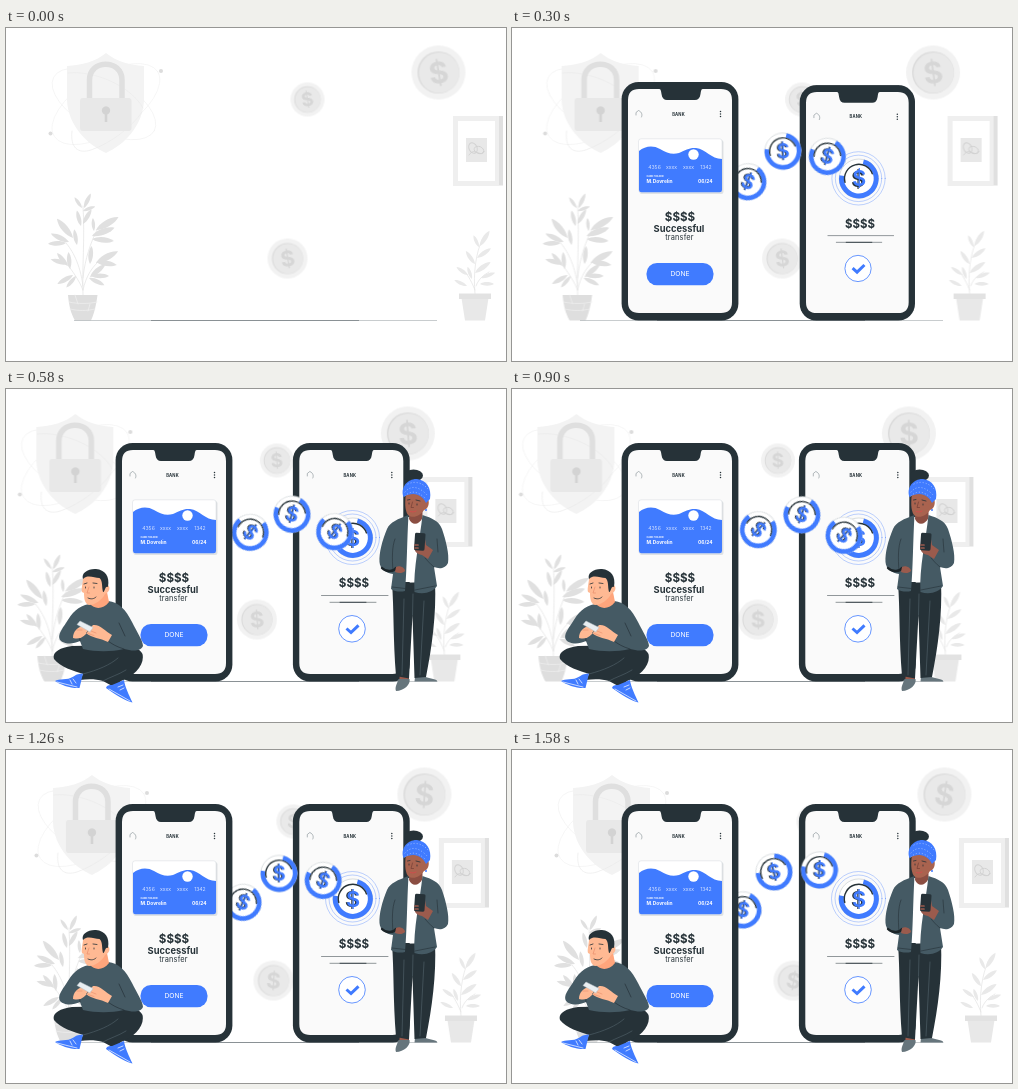
Write an HTML page that moves like this. It is 500 px wide and 333 px high and loops after 1.6 s.

```html
<!DOCTYPE html>
<html lang="en">
<head>
<meta charset="utf-8">
<title>Money transfer</title>
<style>
html, body { margin: 0; width: 100%; height: 100%; overflow: hidden; background: #fff; }
svg { display: block; width: 100vw; height: 100vh; font-family: Inter, "Open Sans", sans-serif; }
text { text-anchor: middle; }
.b { font-weight: 700; }
.start { text-anchor: start; }
.ln { fill: none; stroke-linecap: round; stroke-linejoin: round; }
.butt { stroke-linecap: butt; }
.dark { fill: #263238; }
.blue { fill: #407bff; }
.cloth { fill: #455a64; }

.sway, .spin, .coin, .pop, .grow1, .grow2, .inL, .inR {
  animation: 1.6s cubic-bezier(.37, 0, .63, 1) infinite;
}
.sway { animation-name: sway; }
.spin { animation-name: spin; }
.coin { animation-name: coin; }
.pop { animation-name: pop; }
.grow1 { animation-name: grow1; transform-origin: 168px 292px; }
.grow2 { animation-name: grow2; transform-origin: 348.7px 292px; }
.inL { animation-name: inL; animation-timing-function: ease-out; }
.inR { animation-name: inR; animation-timing-function: ease-out; }

@keyframes sway { 50% { transform: translateX(-37px); } }
@keyframes spin {
  0%, 100% { transform: rotate(-10deg); }
  50% { transform: rotate(10deg); }
}
@keyframes coin {
  0%, 100% { transform: translate(var(--x0), var(--y0)) rotate(var(--r0)); }
  50% { transform: translate(var(--x1), var(--y1)) rotate(var(--r1)); }
}
@keyframes pop { 0% { transform: scale(0); } 6%, 100% { transform: scale(1); } }
@keyframes grow1 { 0% { transform: scale(0); } 11%, 100% { transform: scale(1); } }
@keyframes grow2 { 0% { transform: scale(0); } 20.3%, 100% { transform: scale(1); } }
@keyframes inL { 0%, 19% { transform: translateX(-142px); } 36%, 100% { transform: none; } }
@keyframes inR { 0%, 19% { transform: translateX(130px); } 36%, 100% { transform: none; } }

.c1 { --x0: 231px; --y0: 160px; --r0: 10deg; --x1: 247px; --y1: 140px; --r1: 46deg; }
.c2 { --x0: 262px; --y0: 122px; --r0: -14deg; --x1: 291px; --y1: 126px; --r1: 20deg; }
.c3 { --x0: 307.5px; --y0: 120px; --r0: 2deg; --x1: 333px; --y1: 147.5px; --r1: 46deg; }
</style>
</head>
<body>
<svg viewBox="0 0 500 333">
  <defs>
    <g id="coin">
      <circle r="18.4" fill="#fff"/>
      <circle r="18.2" class="ln" stroke="#9aa5ab" stroke-width=".35"/>
      <circle r="16.1" class="ln butt" stroke="#407bff" stroke-width="4.6"
        pathLength="360" stroke-dasharray="265 95" transform="rotate(-75)"/>
      <circle r="13.3" class="ln" stroke="#263238" stroke-width="1.3"
        pathLength="360" stroke-dasharray="175 185" transform="rotate(-195)"/>
      <g font-size="20" font-weight="600">
        <text class="dark" x="-.8" y="7.4">$</text>
        <text class="blue" x=".3" y="7.1">$</text>
      </g>
    </g>
    <g id="token">
      <circle r="27" fill="#f2f2f2"/>
      <circle r="21" fill="#dadada"/>
      <circle r="20.3" cx=".7" cy=".3" fill="#e9e9e9"/>
      <g class="spin"><text class="b" y="10.8" font-size="30" fill="#d6d6d6">$</text></g>
    </g>
    <g id="shell">
      <rect class="dark" x="109.6" y="54" width="116.8" height="238.6" rx="17"/>
      <path fill="#fafafa" d="M127 61H147C149 61 149 63 149.500 66C150 70 152 72 155 72H183C186 72 188 70 188.500 66C189 63 189 61 191 61H209Q220 61 220 72V274Q220 285 209 285H127Q116 285 116 274V72Q116 61 127 61Z"/>
      <path class="ln" stroke="#7d888d" stroke-width=".6" d="M124 87V84.500L126.500 82.500C130 84 130.500 87 129.500 89"/>
      <text class="b dark" x="166.500" y="87.600" font-size="4.200" letter-spacing=".15">BANK</text>
      <g class="dark"><circle cx="208.500" cy="83.500" r=".75"/><circle cx="208.500" cy="86" r=".75"/><circle cx="208.500" cy="88.500" r=".75"/></g>
    </g>
    <path id="leaf" d="M0 0C.25 -.17 .7 -.19 1 0C.75 .16 .3 .17 0 0Z"/>
  </defs>

  <g class="sway">
    <g class="ln" stroke="#f1f1f1" stroke-width=".6">
      <ellipse cx="100" cy="76" rx="61" ry="29" transform="rotate(-32 100 76)"/>
      <ellipse cx="98" cy="76" rx="57" ry="27" transform="rotate(28 98 76)"/>
    </g>
    <path fill="#f3f3f3" d="M100 25C111 34 124 37 138 38V72C137 98 118 117 100 125C82 117 62 98 61 72V38C76 37 89 34 100 25Z"/>
    <path class="ln" stroke="#ebebeb" stroke-width=".7" d="M62 45C88 42 125 58 137 80M66 103C64 120 72 126 85 122C105 115 126 99 136 84"/>
    <path class="ln butt" stroke="#dfdfdf" stroke-width="5.500" d="M83.500 71V52C83.500 31 116 31 116 52V71"/>
    <rect x="74" y="70" width="51.500" height="33" rx="3" fill="#e8e8e8"/>
    <path fill="#d3d3d3" d="M98.700 94V86.500A4.200 4.200 0 1 1 101.300 86.500V94Z"/>
    <circle cx="155" cy="43" r="2" fill="#dcdcdc"/>
    <circle cx="44.500" cy="105.500" r="2" fill="#dcdcdc"/>

    <use href="#token" x="432.500" y="44.500"/>
    <use href="#token" transform="translate(301.500 71.500) scale(.63)"/>
    <use href="#token" transform="translate(281.500 230.500) scale(.74)"/>

    <path fill="#efefef" d="M447 88H497V158H447Z"/>
    <path fill="#e0e0e0" d="M493 88H497V157H493Z"/>
    <path fill="#fff" d="M452 93H489V153H452Z"/>
    <path fill="#e8e8e8" d="M460 110H481V134H460Z"/>
    <g class="ln" stroke="#d2d2d2" stroke-width=".9">
      <ellipse cx="467" cy="120" rx="4" ry="5.500" transform="rotate(-25 467 120)"/>
      <ellipse cx="473" cy="122" rx="5" ry="3.500" transform="rotate(20 473 122)"/>
      <path d="M463 127C469 118 474 130 478 124"/>
    </g>

    <g class="ln" stroke="#e3e3e3" stroke-width=".7">
      <path d="M77 267C76 240 79 210 77 178M77 258C74 235 66 222 60 215M77 262C72 250 66 243 62 237M77 250C79 230 85 214 91 202M77 262C80 248 86 240 91 235"/>
      <path d="M469 266C467 245 470 225 476 212M469 262C464 250 461 246 458 243M470 258C473 250 478 247 483 244"/>
    </g>
    <g id="plantL" fill="#e0e0e0"></g>
    <g id="plantR" fill="#e9e9e9"></g>
    <path fill="#dedede" d="M62 267H91.500C90 278 88 286 85 292.500H69C65 286 63 278 62 267Z"/>
    <path class="ln" stroke="#eee" stroke-width=".8" d="M63 274C72 276 82 276 91 274M64 281C72 283 81 283 89 281M69 267L72 276M84 276L82 283"/>
    <path fill="#e8e8e8" d="M455.500 270H482.500L479 292.500H459Z"/>
    <path fill="#e2e2e2" d="M453 265.500H485V271H453Z"/>
  </g>

  <path stroke="#a9afb2" stroke-width=".7" d="M68 292.600H431"/>
  <path stroke="#667075" stroke-width=".7" d="M145 292.600H353"/>

  <g class="coin c1"><use class="pop" href="#coin"/></g>

  <g class="grow1">
    <use href="#shell"/>
    <rect x="127.500" y="112" width="84" height="54" rx="2.500" fill="#dfe2e4"/>
    <rect x="126.500" y="110.800" width="83.500" height="53.500" rx="2.500" fill="#fff" stroke="#c9d0d6" stroke-width=".4"/>
    <path class="blue" d="M127 123C133 118 141 117 148 121C155 125 160 127 167 125C174 122 177 119.500 184 120C194 121 199 131 210 131V162Q210 164.300 207.500 164.300H129.500Q127 164.300 127 162Z"/>
    <circle cx="181.500" cy="126.500" r="5.200" fill="#fff"/>
    <g fill="#fff">
      <g font-size="5.200" font-weight="300">
        <text x="142.500" y="141">4356</text><text x="159.500" y="140.700">xxxx</text>
        <text x="176.500" y="140.700">xxxx</text><text x="194" y="141">1342</text>
      </g>
      <text class="b start" x="134.500" y="149" font-size="2.400">CARD HOLDER</text>
      <g class="b" font-size="4.900">
        <text class="start" x="134.500" y="155.300">M.Dovrelin</text>
        <text x="193.300" y="155.300">06/24</text>
      </g>
    </g>
    <g class="dark">
      <text class="b" x="168" y="192.800" font-size="11.600">$$$$</text>
      <text class="b" x="167" y="204.300" font-size="9.300">Successful</text>
      <text x="167.500" y="212.300" font-size="7.400" letter-spacing=".15">transfer</text>
    </g>
    <rect class="blue" x="134.500" y="235" width="67" height="22.300" rx="10.500"/>
    <text x="168" y="248.300" font-size="6.700" fill="#fff">DONE</text>
  </g>

  <g class="grow2">
    <use href="#shell" x="177.300"/>
    <g class="ln" stroke="#407bff" stroke-width=".35">
      <circle cx="346.500" cy="148.500" r="23.500"/><circle cx="346.500" cy="148.500" r="27"/>
    </g>
    <use href="#coin" transform="translate(346.800 148.800) scale(1.09)"/>
    <text class="b dark" x="348" y="198.300" font-size="11.600">$$$$</text>
    <path class="ln" stroke="#263238" stroke-width=".5" d="M315.500 206.500H382M324 213.300H370"/>
    <path class="ln" stroke="#263238" stroke-width=".8" d="M334 213.300H360"/>
    <circle cx="346" cy="239.800" r="13.300" fill="#fff" stroke="#407bff" stroke-width=".8"/>
    <path class="ln butt" stroke="#407bff" stroke-width="3" style="stroke-linejoin:miter" d="M340.500 239.500L345 243.500L352.500 236.300"/>
  </g>

  <g class="coin c2"><use class="pop" href="#coin"/></g>
  <g class="coin c3"><use class="pop" href="#coin"/></g>

  <g class="inL">
    <path class="dark" d="M66 257C52 259 46 264 48 270C54 278 68 282 77 285L74 291C82 290 90 290 97 292L108 298L115 292C128 287 139 276 136.500 265C134 259 125 257 118 256Z"/>
    <path class="ln" stroke="#55666e" stroke-width=".6" d="M77 285C92 281 104 276 112 269M97 292C104 288 112 286 120 281"/>
    <path class="blue" d="M77 284.500L73.500 299C64 299.500 55 296 49 292C53 289 61 292 67.500 287.500C71 285 73 285 77 284.500Z"/>
    <path class="blue" d="M106 296L118 291C119 298 123 306 126.500 313.500C119 312 110 306 100 299C101 296 103 296 106 296Z"/>
    <path class="ln" stroke="#fff" stroke-width=".7" d="M67 290L70 294M64 291L66 295M51 293L71 298M112 298L117 296M114 301L118 299M103 300L124 312"/>
    <path class="cloth" d="M83 215L102 212C113 213 120 221 126 233C131 243 137 252 137 257C134 263 126 262 118 260C105 263 90 263 77 260L74 252C66 256 56 255 53.500 250C52 245 56 240 60 234C66 224 72 217 83 215Z"/>
    <path class="ln" stroke="#263238" stroke-width=".7" d="M74 252L73 241M118 260C111 258 106 255 102 252M113 234L119 247"/>
    <path fill="#ffa57c" d="M89 207L101 203L103 213C97 221 88 220 84 215Z"/>
    <path fill="#ffb993" d="M77 189C77 194 75 199 76 203L78 204C78 210 79 215 83 216C89 216 96 211 99 205C104 203 105 197 101 196C101 187 96 183 88 184Z"/>
    <path class="dark" d="M77 190C75 184 82 179.500 90 180C99 181 104 187 102 198C99 196 99 203 97 203C95.500 198 97 192 93.500 189C88 189 82 185 77 190Z"/>
    <path class="ln" stroke="#263238" stroke-width=".8" d="M78 195L81 194M87 194L91 194.500M79.500 198V199M88 198V199M82 209C85 210.500 88 210 90 208"/>
    <path class="ln" stroke="#e88d6c" stroke-width=".7" d="M83 198L81 204H83.500"/>
    <path fill="#ffb993" d="M67 249C67 243 71 238 77 237L83 241C79 247 75 251 67 249ZM106 246C99 242 94 235 87 236L80 244C86 249 94 249 102 253Z"/>
    <path fill="#e9eef1" stroke="#b9c3c8" stroke-width=".5" d="M71 235.500L74 232L87 238.500L84 243Z"/>
    <path class="ln" stroke="#e88d6c" stroke-width=".6" d="M85 242L90 244M82 244.500L88 246.500M71 241L76 241"/>
  </g>

  <g class="inR">
    <path fill="#9b5b4d" d="M394 284H403V293H393ZM409 284H419V290H409Z"/>
    <path fill="#66757c" d="M392.500 290L403.500 290C405 295 398 302 390 302C388.500 298 391.500 294 392.500 290ZM409 288L419 287.500C422 289.500 431 289.500 431.500 292.500H408.500Z"/>
    <path class="dark" d="M386 194C388 220 387 250 390 287L403 289.500L406.500 226L408.500 289L420 288C426 258 430.500 225 429 193Z"/>
    <path class="ln" stroke="#55666e" stroke-width=".6" d="M406.500 226L407 205M398 210L396 286M418 212L414 286"/>
    <path fill="#fff" d="M401 128H417L410 193H398Z"/>
    <path fill="#8b4e42" d="M403.500 120H416.500V129C413 136 406 137 403 130Z"/>
    <path class="cloth" d="M402.500 126C392 130 384 133 381 140C376 152 373 164 373.500 173C374 180 380 184 387 185L385 200C389 203 395 203 399 202C401 180 401 150 402.500 126Z"/>
    <path class="cloth" d="M416.500 126C426 129 433 132 436 140C440 152 443.500 165 442 174C439 180 433 180 428 178L431 197C427 203 418 206 408.500 203C407 180 414 150 416.500 126Z"/>
    <path class="ln" stroke="#263238" stroke-width=".6" d="M389 150C386 158 386 168 387 183M428 178C424 175 421 171 419 169M431 150L432 163M386 198L399 199.500M409 201L429 197"/>
    <path class="ln" stroke="#1b2428" stroke-width="2.400" d="M376 179C381 184 388 182 390 179"/>
    <path fill="#9b5b4d" d="M390 178C394 176 399 179 399 182C396 185 392 184 389 183Z"/>
    <path fill="#9b5b4d" d="M409 156C407 161 410 165 416 166L422 170L427 161L420 156L419 150L416 154Z"/>
    <rect class="dark" x="408.500" y="144" width="10.500" height="17.500" rx="1.500" transform="rotate(4 414 153)"/>
    <path class="ln" stroke="#9b5b4d" stroke-width="1.700" d="M409 156H412M409 159H412"/>
    <ellipse class="dark" cx="407.500" cy="86.500" rx="9.500" ry="6"/>
    <path fill="#a9634f" d="M400 104C399 112 398.500 121 402 126C407 130 414 127 418 121C422 120 424 114 422 110L420 102Z"/>
    <path class="blue" d="M397.500 108C394 98 402 89.500 411 90C420 91 426 99 424 110L420 114C416 106 408 102 397.500 108Z"/>
    <path class="ln" stroke="#bcd0ff" stroke-width=".8" stroke-dasharray=".1 3" d="M399 103C405 96 413 97 422 107M402 95C410 91 418 95 423 101M399 107C405 101 412 102 420 110"/>
    <path class="ln" stroke="#263238" stroke-width=".8" d="M401.500 111L404 110.500M410 111L414 112M403 114V115M411 115V116"/>
    <path class="ln" stroke="#743e35" stroke-width=".7" d="M406.500 113L405 118.500H407.500"/>
    <path class="ln" stroke="#d14d4d" stroke-width="1" d="M404.500 122.500C406.500 123.300 408 123 410 122"/>
    <circle cx="420" cy="121" r="1" fill="#407bff"/>
  </g>
</svg>
<script>
// Each leaf: stalk x, stalk y, angle, length
const leavesL = [
  [76, 180, -125, 13], [78, 180, -65, 16], [77, 183, -20, 13],
  [75, 198, -105, 16], [77, 196, -60, 17], [88, 203, -95, 13],
  [90, 202, -30, 26], [86, 208, -20, 24], [86, 211, 5, 22],
  [67, 210, -130, 25], [63, 214, -155, 20], [60, 215, 178, 18],
  [71, 217, -100, 16], [62, 236, -165, 18], [62, 238, -130, 17],
  [64, 241, -95, 17], [67, 247, 150, 18], [70, 248, 130, 15],
  [84, 236, -85, 18], [90, 235, -28, 25], [90, 234, 8, 21],
  [84, 249, -40, 20], [85, 248, 0, 18], [83, 250, 25, 17]
];
const leavesR = [
  [474, 218, -58, 18], [473, 219, -115, 13], [471, 230, -35, 17],
  [469, 236, -125, 16], [469, 245, -35, 19], [462, 247, -145, 14],
  [466, 251, -110, 13], [475, 250, -20, 15], [461, 258, -155, 14],
  [474, 256, 0, 14]
];

function grow(id, leaves) {
  document.getElementById(id).innerHTML = leaves.map(([x, y, angle, len]) =>
    `<use href="#leaf" transform="translate(${x} ${y}) rotate(${angle}) scale(${len})"/>`).join("");
}

grow("plantL", leavesL);
grow("plantR", leavesR);
</script>
</body>
</html>
```
